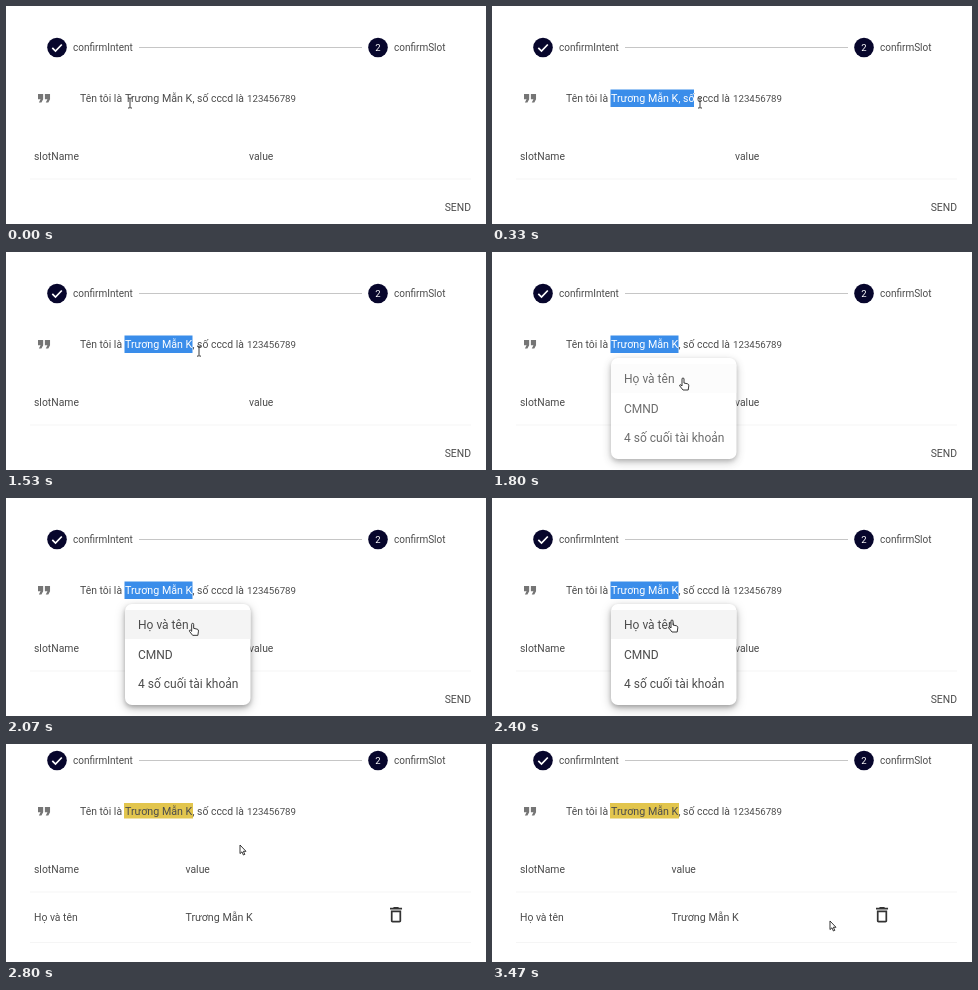
Write an HTML page that moves like this. It is 480 px wide and 218 px high and loops after 3.54 s.

```html
<!DOCTYPE html>
<html lang="vi">
<head>
<meta charset="utf-8">
<title>Confirm slot</title>
<style>
  html, body { margin: 0; width: 100%; height: 100%; overflow: hidden; background: #fff; }
  svg { display: block; width: 100%; height: 100%; }
  text { font: 10.4px Roboto, "Open Sans", sans-serif; fill: #4c4c4c; white-space: pre; }
  .step { font-size: 10px; }
  .name { font-size: 10.7px; }
  .digits { font-size: 9.7px; }
  #menu text { font-size: 12px; }
  #menu .box { fill: #fff; filter: drop-shadow(0 2px 2px #0003) drop-shadow(0 3px 5px #0004); }
  .disc { fill: #07062c; }
  .rule { stroke: #f5f5f5; }
  #pointers path { stroke-linejoin: round; }
</style>
</head>
<body>
<svg viewBox="0 0 480 218">
  <defs>
    <clipPath id="selClip"><rect id="selArea" x="118.5" y="83.5" height="17.5"/></clipPath>
    <text id="sentence" y="96" style="fill:inherit"><tspan x="74">Tên tôi là</tspan><tspan class="name" x="119">Trương Mẫn K</tspan><tspan x="186.5">, số cccd là</tspan><tspan class="digits" x="241">123456789</tspan></text>
  </defs>

  <g id="page">
    <circle class="disc" cx="51" cy="41.5" r="9.8"/>
    <path d="M46.3 41.8l3.2 3.2 6.3-6.5" fill="none" stroke="#fff" stroke-width="1.7"/>
    <text class="step" x="67" y="45.3">confirmIntent</text>
    <path d="M133 41.5H356" stroke="#c6c6c6"/>
    <circle class="disc" cx="372" cy="41.5" r="9.8"/>
    <text x="372" y="45" text-anchor="middle" style="font-size:9.5px;fill:#fff">2</text>
    <text class="step" x="388" y="45.3">confirmSlot</text>

    <path transform="translate(27.7 82)scale(.86)" fill="#757575" d="M6 17h3l2-4V7H5v6h3zm8 0h3l2-4V7h-6v6h3z"/>
    <rect id="mark" x="118" y="84" width="69" height="15.5" fill="#e2c54d"/>
    <use href="#sentence" fill="#4c4c4c"/>
    <g clip-path="url(#selClip)">
      <rect x="100" y="80" width="200" height="25" fill="#3a8dea"/>
      <use href="#sentence" fill="#fff"/>
    </g>

    <text x="28" y="153.5">slotName</text>
    <text id="value" y="153.5">value</text>
    <path class="rule" d="M24 173H465"/>
    <text id="send" x="438.7" y="205.3">SEND</text>
    <g id="row">
      <text x="28" y="202">Họ và tên</text>
      <text class="name" x="179.5" y="202">Trương Mẫn K</text>
      <path transform="translate(379.7 185.4)scale(.86)" fill="#333" d="M6 19c0 1.1.9 2 2 2h8c1.1 0 2-.9 2-2V7H6zM8 9h8v10H8zm7.5-5l-1-1h-5l-1 1H5v2h14V4z" fill-rule="evenodd"/>
      <path class="rule" d="M24 223.5H465"/>
    </g>

    <g id="menu">
      <rect class="box" x="119" y="106" width="125.5" height="101" rx="7"/>
      <rect id="hover" x="119" y="112" width="125.5" height="29" fill="#f4f4f4"/>
      <text x="132" y="131">Họ và tên</text>
      <text x="132" y="160.5">CMND</text>
      <text x="132" y="190">4 số cuối tài khoản</text>
    </g>
  </g>

  <g id="pointers">
    <path id="beam" d="M-2-5h1.5l.5.5.5-.5H2M0-4.5v9M-2 5h1.5l.5-.5.5.5H2" fill="none" stroke="#222" stroke-width=".9"/>
    <path id="hand" d="M-1 1q0-1 1-1t1 1v4l3.5.8q1.5.4 1.3 2L5.2 12H0L-3.2 8q-.5-1.3.8-1.3L-1 8z" fill="#fff" stroke="#222" stroke-width=".9"/>
    <path id="arrow" d="M0 0v8.6l2-1.8 1.4 3.2 1.4-.6L3.4 6.3H6z" fill="#fff" stroke="#222" stroke-width=".9"/>
  </g>
</svg>

<script>
const LOOP = 3540, FPS = 15, SWITCH = 2530;
const $ = id => document.getElementById(id);
const clamp = v => Math.min(1, Math.max(0, v));
const ramp = (t, start, length) => clamp((t - start) / length);
const easeOut = p => 1 - (1 - p) ** 3;
const show = (id, on) => $(id).style.display = on ? '' : 'none';

// Pointer path: time, x, y
const path = [
  [0, 124, 97], [200, 124, 97], [330, 208, 97], [400, 208, 97], [600, 262, 97],
  [800, 195, 98], [930, 195, 98], [1000, 193, 98], [1470, 193, 98], [1530, 193, 99],
  [1600, 193, 101], [1800, 191, 126], [2000, 188, 126], [2400, 180, 122], [2530, 180, 122],
  [2800, 234, 101], [3070, 247, 87], [3130, 251, 88], [3400, 335, 173], [3467, 338, 177]
];

function pointAt(t) {
  const i = path.findIndex(k => k[0] > t);
  if (i < 0) return path[path.length - 1].slice(1);
  const a = path[i - 1], b = path[i], p = (t - a[0]) / (b[0] - a[0]);
  return [1, 2].map(n => a[n] + (b[n] - a[n]) * p);
}

function draw(t) {
  const done = t >= SWITCH, [x, y] = pointAt(t);
  $('page').setAttribute('transform', `translate(0 ${done ? -25 : 0})`);
  $('value').setAttribute('x', done ? 179.5 : 243);
  show('mark', done);
  show('row', done);
  show('send', !done);

  const edge = t < 800 ? x - 6 : t < 1000 ? 189 : 186.5;
  $('selArea').setAttribute('width', done || t < 240 ? 0 : Math.max(0, edge - 118.5));

  const grow = easeOut(ramp(t, 1540, 240));
  const opacity = ramp(t, 1540, 320) * (1 - ramp(t, 2470, 200));
  const sx = .75 + .25 * grow, sy = .56 + .44 * grow;
  $('menu').setAttribute('opacity', opacity);
  $('menu').setAttribute('transform', `translate(119 106)scale(${sx} ${sy})translate(-119 -106)`);
  $('hover').setAttribute('opacity', .3 + .7 * ramp(t, 1800, 200));
  show('hover', t > 1740);

  const shape = t < 1600 ? 'beam' : t > 1690 && !done ? 'hand' : 'arrow';
  for (const id of ['beam', 'hand', 'arrow']) show(id, id === shape);
  $('pointers').setAttribute('transform', `translate(${x} ${y})`);
}

const start = performance.now();
function tick() {
  const t = (performance.now() - start) % LOOP;
  draw(Math.floor(t * FPS / 1000 + .15) * 1000 / FPS);
  requestAnimationFrame(tick);
}
tick();
</script>
</body>
</html>
```
